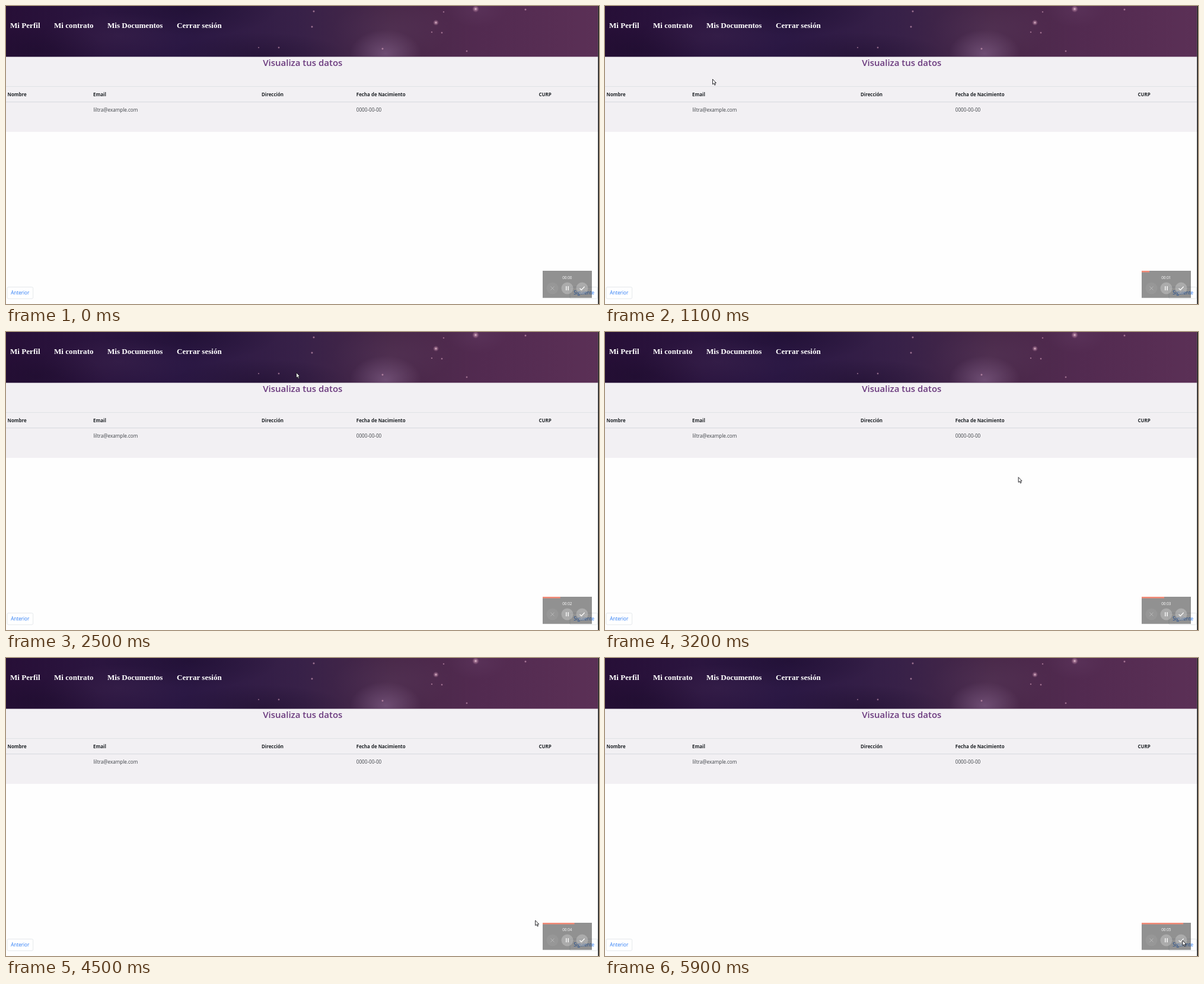
An HTML page for the animation above (6 s loop, 1000 by 502 pixels).

```html
<!DOCTYPE html>
<html lang="es">
<head>
<meta charset="utf-8">
<title>Visualiza tus datos</title>
<style>
  html, body { margin: 0; width: 100%; height: 100%; overflow: hidden; background: #fefefe; }
  svg { display: block; width: 100vw; height: 100vh; }
  text { font-family: "Open Sans", "Noto Sans", sans-serif; font-size: 8.15px; fill: #3c4045; }
  .nav text { font: bold 13.1px "Liberation Serif", "Times New Roman", serif; fill: #fff; }
  .nav rect { fill: #fff; opacity: 0; }
  .nav .on text { fill: #150c1c; text-decoration: underline; }
  .nav .on rect { opacity: .14; }
  .title { font-size: 15px; font-weight: 600; fill: #6b3a7e; text-anchor: middle; }
  .head text { font-size: 7.92px; font-weight: 700; fill: #212529; }
  .link { fill: #2a7bf5; }
  .btn { fill: #fff; stroke: #dee2e6; stroke-width: .8; }
  .timer { font-size: 6.4px; fill: #fff; text-anchor: middle; }
  .disc { fill: #fff; opacity: .24; }
  .icon { fill: none; stroke: #fff; stroke-width: 1.3; }
  .pointer { fill: #fff; stroke: #16161a; stroke-width: .9; stroke-linejoin: round; }
</style>
</head>
<body>
<svg viewBox="0 0 1000 502" preserveAspectRatio="none">
  <defs>
    <linearGradient id="sky">
      <stop offset="0" stop-color="#270f37"/>
      <stop offset=".16" stop-color="#2b153f"/>
      <stop offset=".3" stop-color="#2a1743"/>
      <stop offset=".5" stop-color="#382148"/>
      <stop offset=".65" stop-color="#482848"/>
      <stop offset=".8" stop-color="#522a50"/>
      <stop offset="1" stop-color="#5b3056"/>
    </linearGradient>
    <radialGradient id="glow">
      <stop offset="0" stop-color="#8c6a94" stop-opacity=".55"/>
      <stop offset="1" stop-color="#8c6a94" stop-opacity="0"/>
    </radialGradient>
    <radialGradient id="shade">
      <stop offset="0" stop-color="#1a0b2a" stop-opacity=".45"/>
      <stop offset="1" stop-color="#1a0b2a" stop-opacity="0"/>
    </radialGradient>
    <radialGradient id="star">
      <stop offset="0" stop-color="#fbe6ef"/>
      <stop offset=".25" stop-color="#e0aec6" stop-opacity=".65"/>
      <stop offset="1" stop-color="#b97a9f" stop-opacity="0"/>
    </radialGradient>
    <clipPath id="top"><path d="M0 0H998.4V85.6H0z"/></clipPath>
  </defs>

  <rect width="1000" height="502" fill="#fefefe"/>
  <path d="M0 85H998.4V212H0z" fill="#f2f0f3"/>
  <g clip-path="url(#top)">
    <rect width="1000" height="86" fill="url(#sky)"/>
    <g fill="url(#shade)">
      <ellipse cx="50" cy="75" rx="120" ry="45"/>
      <ellipse cx="310" cy="5" rx="150" ry="45"/>
      <ellipse cx="430" cy="85" rx="150" ry="40"/>
    </g>
    <g fill="url(#glow)">
      <ellipse cx="640" cy="80" rx="60" ry="40"/>
      <ellipse cx="650" cy="40" rx="100" ry="50" opacity=".2"/>
      <ellipse cx="190" cy="50" rx="130" ry="40" opacity=".15"/>
      <ellipse cx="795" cy="6" rx="50" ry="30" opacity=".2"/>
    </g>
    <g id="stars" fill="url(#star)"></g>
  </g>
  <g class="nav" id="nav"></g>

  <text class="title" x="500.3" y="101.4">Visualiza tus datos</text>
  <path d="M0 135.6H998.4" stroke="#dee0e4" stroke-width=".9"/>
  <path d="M0 161.6H998.4" stroke="#dadce1" stroke-width="1.2"/>
  <g class="head">
    <text x="2.5" y="152">Nombre</text>
    <text x="147" y="152">Email</text>
    <text x="431" y="152">Dirección</text>
    <text x="590.8" y="152">Fecha de Nacimiento</text>
    <text x="898.5" y="152">CURP</text>
  </g>
  <text x="147.5" y="178.2">liltra@example.com</text>
  <text x="590.8" y="178.2">0000-00-00</text>

  <rect class="btn" x="2" y="473.5" width="43.6" height="19.5" rx="2"/>
  <text class="link" x="8.2" y="486.4">Anterior</text>
  <rect class="btn" x="951" y="473.5" width="46.8" height="19.5" rx="2"/>
  <text class="link" x="957.2" y="486.4">Siguiente</text>
  <path d="M998.4 0H1000V502H998.4z" fill="#111"/>

  <g>
    <rect x="905" y="446" width="83" height="45.7" opacity=".43"/>
    <rect id="bar" x="905" y="446" width="0" height="2.6" fill="#f28b78"/>
    <text class="timer" id="timer" x="946.3" y="460">00:00</text>
    <circle class="disc" cx="921.5" cy="475.5" r="10" style="opacity:.06"/>
    <circle class="disc" cx="946.5" cy="475.5" r="10"/>
    <circle class="disc" cx="971.5" cy="475.5" r="10"/>
    <path class="icon" d="M918.5 472.5l6 6m0-6l-6 6" stroke-opacity=".3" style="stroke-width:1"/>
    <path class="icon" d="M944.8 472v7m3.4-7v7"/>
    <path class="icon" d="M967.6 475.7l2.7 2.7 5.4-5.6"/>
  </g>

  <g id="cursor" class="pointer">
    <path id="arrow" d="M0 0V8.6L2 6.9L3.4 10L4.9 9.3L3.5 6.3H6z"/>
    <path id="hand" d="M2.2 6.8V1.2Q3 .2 3.7 1.2V4.2L7.2 5Q8.2 5.4 8 6.8L7.2 11.6H3.2L.4 7.7Q.2 6.4 1.2 6.6z" stroke-width=".6"/>
  </g>
</svg>
<script>
const $ = id => document.getElementById(id);
const LOOP = 6000, STEP = 100;

// x, y, radius
const stars = [
  [792, 5, 6], [725, 28, 5], [738, 10, 1.8], [735, 45, 2], [718, 44, 1.8], [777, 76, 2],
  [876, 6, 2.2], [519, 9, 2.2], [516, 35, 2.2], [460, 70, 2], [635, 72, 2.2], [426, 70, 1.6]
];
$('stars').innerHTML = stars.map(([x, y, r]) => `<circle cx="${x}" cy="${y}" r="${r}"/>`).join('');

// label, text x, box width, hover start and end
const menu = [
  ['Mi Perfil', 7, 73, 0, 0],
  ['Mi contrato', 81, 89, 0, 0],
  ['Mis Documentos', 171, 115, 1300, 1500],
  ['Cerrar sesión', 288, 97.5, 1500, 1800]
];
$('nav').innerHTML = menu.map(([label, x, w]) =>
  `<g><rect x="${x - 11}" y="12" width="${w}" height="40.7"/><text x="${x}" y="37">${label}</text></g>`).join('');
const items = [...$('nav').children];

// time, x, y
const route = [
  [100, 975, 475], [1000, 224, 112], [1100, 181.5, 123.3], [1400, 182, 16], [1700, 385, 50.3],
  [2500, 489.6, 68.5], [3900, 904.7, 420.8], [5100, 880.6, 463.2], [5900, 974, 475.8]
];

function cursorAt(t) {
  let i = 0;
  while (i < route.length - 2 && t >= route[i + 1][0]) i++;
  const [t0, x0, y0] = route[i], [t1, x1, y1] = route[i + 1];
  const p = Math.min(1, Math.max(0, (t - t0) / (t1 - t0)));
  const e = p * p * (3 - 2 * p);
  return [x0 + (x1 - x0) * e, y0 + (y1 - y0) * e];
}

function draw(now) {
  const t = Math.floor(now % LOOP / STEP) * STEP;
  let hover = false;
  menu.forEach(([, , , from, to], i) => {
    const on = t >= from && t < to;
    items[i].classList.toggle('on', on);
    hover = hover || on;
  });
  $('cursor').setAttribute('transform', `translate(${cursorAt(t)})`);
  $('cursor').style.display = t < route[0][0] ? 'none' : '';
  $('arrow').style.display = hover ? 'none' : '';
  $('hand').style.display = hover ? '' : 'none';
  $('bar').setAttribute('width', t * .0119);
  $('timer').textContent = '00:0' + Math.floor(t / 1000);
}

const start = performance.now();
function tick() {
  draw(performance.now() - start);
  requestAnimationFrame(tick);
}
tick();
</script>
</body>
</html>
```
